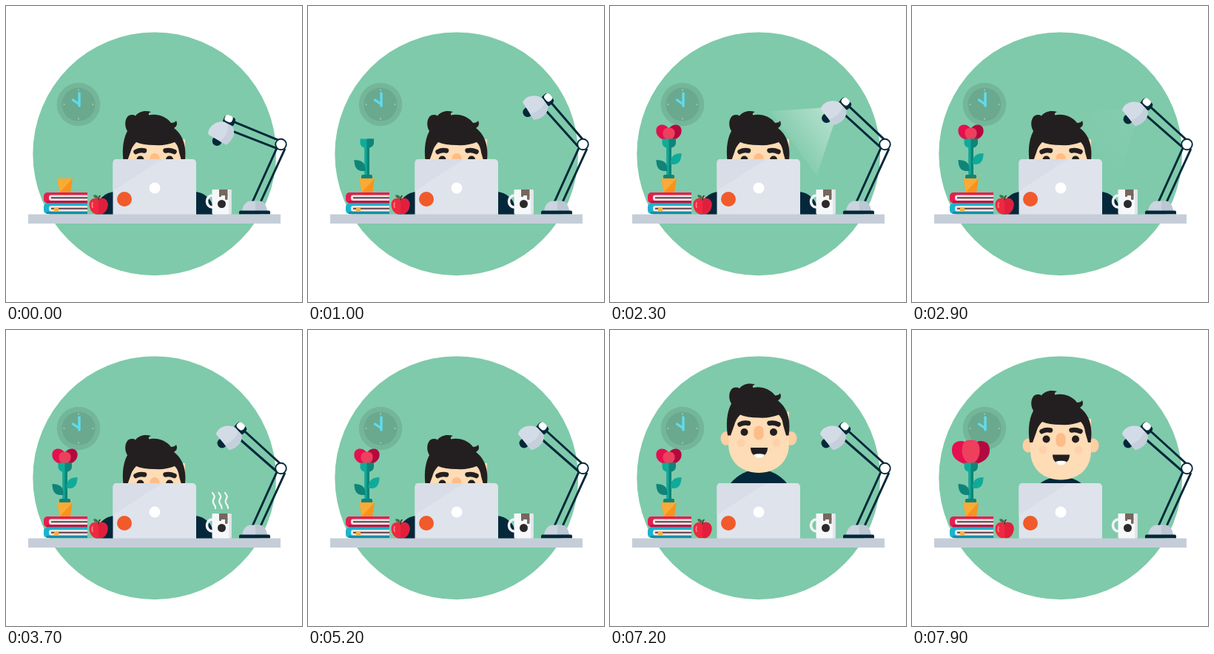
An HTML page with a canvas that plays this animation: 400x400 px, repeating every 8 s.

```html
<!DOCTYPE html>
<html lang="en">
<head>
<meta charset="utf-8">
<title>Desk at work</title>
<style>
html, body { margin: 0; width: 100%; height: 100%; overflow: hidden; background: #fff; }
canvas { display: block; width: 400px; height: 400px; }
</style>
</head>
<body>
<canvas id="stage"></canvas>
<script>
const canvas = document.getElementById('stage');
const c = canvas.getContext('2d');
const dpr = window.devicePixelRatio || 1;
canvas.width = canvas.height = 400 * dpr;

const LOOP = 8000, STEP = 100;
const NAVY = '#04283a', DESK = '#c5ced8', HAIR = '#231f20', SKIN = '#fddcb6';
const TEAL = '#0f8478', MINT = '#10ab98';

const clamp = v => Math.max(0, Math.min(1, v));
const ease = v => v * v * (3 - 2 * v);
const ramp = (t, a, b) => ease(clamp((t - a) / (b - a)));

// Smooth interpolation through [time, value] pairs
function track(t, keys) {
  if (t <= keys[0][0]) return keys[0][1];
  for (let i = 1; i < keys.length; i++) {
    const [a, from] = keys[i - 1], [b, to] = keys[i];
    if (t <= b) return from + (to - from) * ramp(t, a, b);
  }
  return keys[keys.length - 1][1];
}

function rect(x, y, w, h, color, r = 0) {
  c.fillStyle = color;
  c.beginPath();
  c.roundRect(x, y, w, h, r);
  c.fill();
}

function oval(x, y, rx, ry, color) {
  c.fillStyle = color;
  c.beginPath();
  c.ellipse(x, y, rx, ry, 0, 0, Math.PI * 2);
  c.fill();
}

const disc = (x, y, r, color) => oval(x, y, r, r, color);

function shape(d, color) {
  c.fillStyle = color;
  c.fill(new Path2D(d));
}

function line(d, color, width, cap = 'round') {
  c.strokeStyle = color;
  c.lineWidth = width;
  c.lineCap = cap;
  c.lineJoin = 'round';
  c.stroke(new Path2D(d));
}

// Draw around a local origin with scale and rotation
function local(x, y, sx, sy, turn, draw) {
  if (!sx || !sy) return;
  c.save();
  c.translate(x, y);
  c.rotate(turn);
  c.scale(sx, sy);
  draw();
  c.restore();
}

function clock() {
  disc(98, 133, 29.3, '#74b699');
  disc(98, 133, 22.5, '#6aa98e');
  for (let i = 0; i < 4; i++) {
    const a = i * Math.PI / 2;
    disc(98 + 19.5 * Math.cos(a), 133 + 19.5 * Math.sin(a), 1, '#a5cfbd');
  }
  line('M99 118V135', '#5fdcf0', 3.4);
  line('M90.5 127L98.5 132.500', '#5fdcf0', 3.2);
}

function person(t) {
  const lift = track(t, [[6100, 0], [6300, -3], [6600, -9], [7100, -71], [7300, -68], [7600, -59], [7900, -60]]);
  const reach = track(t, [[6200, 80], [6600, 58], [7000, 54]]);
  c.save();
  c.beginPath();
  c.rect(0, 0, 400, 282);
  c.clip();
  rect(201 - reach, 251, reach * 2, 60, NAVY, 27);
  c.translate(0, 60 + lift);
  oval(201, 262, 54, 64, NAVY);
  head();
  c.restore();
}

function head() {
  oval(157, 156, 7.5, 9.5, '#fdcfa2');
  oval(245, 156, 7.5, 9.5, '#fdcfa2');
  shape('M160 120H242V163C242 188 224 202.500 201 202.500C178 202.500 160 188 160 163Z', SKIN);
  disc(177, 162, 5.5, '#fdd2aa');
  disc(225, 162, 5.5, '#fdd2aa');
  rect(194.5, 139, 13, 19, '#fdbd88', 6.5);
  for (const x of [181.5, 221]) disc(x, 147.5, 5, HAIR);
  line('M175.500 137Q181 134 187 135.500', HAIR, 6.5);
  line('M215.500 135.500Q221 134 227.500 137', HAIR, 6.5);
  shape('M190 168.500H213C213 176 208 181.500 201.500 181.500S190 176 190 168.500Z', HAIR);
  shape('M194 178Q201.500 175.500 209 178Q206 182.500 201.500 182.500T194 178Z', '#fff');
  shape('M163 152H159C157 138 157 122 164 109C160 103 160 92 166 88Q171 86 175 88.500' +
    'C179 83 187 80.500 196 83Q191 85 193.500 87.500C205 85 217 90 223 98Q228 98 230 95' +
    'Q233 101 227 105C239 114 245 130 241.500 152H238L234 138Q233 129 228 124' +
    'Q216 129 201 128Q185 128 176 124Q170 130 168 138Z', HAIR);
}

function laptop() {
  rect(144.5, 207, 112.5, 75, '#dfe3ec', [5, 5, 0, 0]);
  shape('M149 207H211L144.500 250V212Q144.500 207 149 207Z', '#d8dde7');
  disc(201, 246, 7.5, '#fff');
  disc(160, 261, 10, '#f15a2b');
}

function book(y, cover, dark) {
  rect(51, y, 59, 14.5, cover, [5, 0, 0, 5]);
  rect(58, y + 3.5, 52, 7.5, '#ece6e6', [3, 0, 0, 3]);
  rect(61, y + 6.3, 49, 2, '#5c4148');
  rect(55, y + 11.5, 55, 3, dark);
}

function books() {
  book(252, '#e51f4f', '#b81543');
  book(266.5, '#1ab3ce', '#148da9');
  rect(65, 273, 6, 5, '#fbb03b');
}

function bloom(open, full) {
  const side = 'M0 0C-13 -1 -18 -8 -17 -15C-16 -23 -5 -24 0 -16Z';
  const s = open * (1 + full * 0.49);
  local(79.5, 182, s, s, 0, () => {
    shape(side, '#e60f4f');
    c.save();
    c.scale(-1, 1);
    shape(side, '#b4093f');
    c.restore();
    const h = -17 - 5 * full;
    shape(`M0 0C-10 -4 -10 ${h + 3} -4 ${h}Q0 ${h - 1} 4 ${h}C10 ${h + 3} 10 -4 0 0Z`, '#ee3f5d');
  });
}

function flower(t) {
  const grow = ramp(t, 0, 900);
  const top = 238 - 54 * grow;
  if (grow > 0) {
    c.save();
    c.beginPath();
    c.rect(40, 100, 80, 134);
    c.clip();
    rect(76.5, top, 6.5, 240 - top, TEAL);
    rect(76.5, top, 3, 240 - top, MINT);
    rect(72, 264 - 36 * grow, 15, 6, TEAL, 2);
    const left = ramp(t, 500, 950), right = ramp(t, 1000, 1500);
    local(77.5, 223, left, left, 0, () =>
      shape('M0 0H-5Q-15 -1 -15 -15Q-1 -15 0 -4Z', TEAL));
    local(82, 214, right, right, 0, () =>
      shape('M0 0H5Q14.500 -1 14.500 -15Q1 -15 0 -4Z', MINT));
    c.restore();
    bloom(track(t, [[1000, 0], [1500, 1.14], [1800, 1]]),
      track(t, [[7300, 0], [7700, 1.06], [7900, 1]]));
    c.save();
    c.translate(0, top - 184);
    c.beginPath();
    c.rect(60, 170, 40, 248 - top);
    c.clip();
    shape('M70.500 179.500H89V185Q88 192 79.500 192T70.500 185Z', MINT);
    shape('M79.500 179.500H89V185Q88 192 79.500 192Z', TEAL);
    c.restore();
  }
  shape('M69.500 233H90L87 252H72.500Z', '#f5941f');
  shape('M69.500 233H90L72.500 252Z', '#fbab35');
}

function apple() {
  shape('M125 261C130 258 138 261 137.500 269C137 277 131 283 125 281' +
    'C119 283 113 277 112.500 269C112 261 120 258 125 261Z', '#f0283f');
  shape('M125 261C130 258 138 261 137.500 269C137 277 131 283 125 281Z', '#e01f3d');
  line('M117 266Q115.500 269 117 272', '#fa7f8c', 1.8);
  line('M125 262Q125 258 127 256.500', '#5b3427', 1.6);
  shape('M125 260Q119 261 118 255.500Q124 254.500 125 260Z', '#2f7d4c');
}

function steam(t) {
  const head = ramp(t, 3000, 3600), tail = ramp(t, 4200, 4900);
  if (head <= tail) return;
  c.save();
  c.beginPath();
  c.rect(270, 243 - 25 * head, 40, 25 * (head - tail));
  c.clip();
  for (const x of [281, 289.5, 298]) {
    line(`M${x + 2} 241C${x + 3} 236 ${x - 3} 235 ${x - 1} 230S${x + 2} 226 ${x - 2} 220`, '#f4f8f6', 2.2);
  }
  c.restore();
}

function mug() {
  c.strokeStyle = '#f1f2f5';
  c.lineWidth = 3.6;
  c.beginPath();
  c.ellipse(278.5, 264, 7, 8, 0, Math.PI / 2, Math.PI * 1.5);
  c.stroke();
  rect(278.5, 248, 26, 34, '#f6f7f9', [1, 1, 2, 2]);
  rect(301, 248, 3.5, 34, '#e3e6eb', [0, 1, 2, 0]);
  rect(288, 248, 11.5, 8, '#75675d');
  rect(296, 254, 3.5, 8, '#75675d', 1.5);
  rect(288, 255, 3, 3, '#75675d', 1);
  disc(291.5, 267.5, 5.5, '#2b292c');
}

function lampHead(t) {
  const turn = track(t, [[0, -20], [800, 8], [1000, 7], [1800, 1.5], [2300, 1], [3000, 0]]) * Math.PI / 180;
  const glow = ramp(t, 1700, 2200) * (1 - ramp(t, 2500, 3000));
  local(372, 187, 1, 1, turn, () => {
    c.translate(-372, -187);
    if (glow > 0) {
      const g = c.createLinearGradient(298, 148, 246, 188);
      g.addColorStop(0, `rgba(255,255,255,${0.42 * glow})`);
      g.addColorStop(1, `rgba(255,255,255,${0.06 * glow})`);
      shape('M285 139L216 145L280 231L302 161Z', g);
    }
    line('M313 145L365 190.500', NAVY, 3);
    line('M320 134.500L370 180', NAVY, 3);
    local(317.5, 133.5, 1, 1, 0.7, () => {
      rect(-9, -6, 16, 12, NAVY, 4);
      rect(-8, -7, 11, 9, '#fff', 4);
    });
    disc(292, 153, 6.5, NAVY);
    shape('M284 141C285 132 299 126 310 132L318 141C321 150 312 160 301.500 162Z', '#d3dce6');
    shape('M314 136.500L318 141C321 150 312 160 301.500 162L295 154.500Q309 151 314 136.500Z', '#c5d0dc');
  });
}

function lamp(t) {
  line('M332.500 266L365.500 193', NAVY, 3);
  line('M343.500 266L376.500 194', NAVY, 3);
  shape('M319 277Q321 264 331 263.500H342Q351 264 353 277Z', '#cbd4df');
  shape('M337 263.500H342Q351 264 353 277H337Z', '#bcc7d3');
  rect(315, 276.5, 42, 5, NAVY, [2, 2, 0, 0]);
  lampHead(t);
  disc(371.5, 187, 8.2, NAVY);
  disc(371.5, 187, 6.3, '#fff');
}

function draw(t) {
  c.setTransform(dpr, 0, 0, dpr, 0, 0);
  c.fillStyle = '#fff';
  c.fillRect(0, 0, 400, 400);
  disc(200.7, 199.8, 164.4, '#7fcaab');
  clock();
  person(t);
  laptop();
  books();
  flower(t);
  apple();
  steam(t);
  mug();
  lamp(t);
  rect(30, 281.5, 341, 12.5, DESK);
}

const start = performance.now();
function frame(now) {
  const t = Math.max(0, now - start) % LOOP;
  draw(Math.floor(t / STEP) * STEP);
  requestAnimationFrame(frame);
}
draw(0);
requestAnimationFrame(frame);
</script>
</body>
</html>
```
